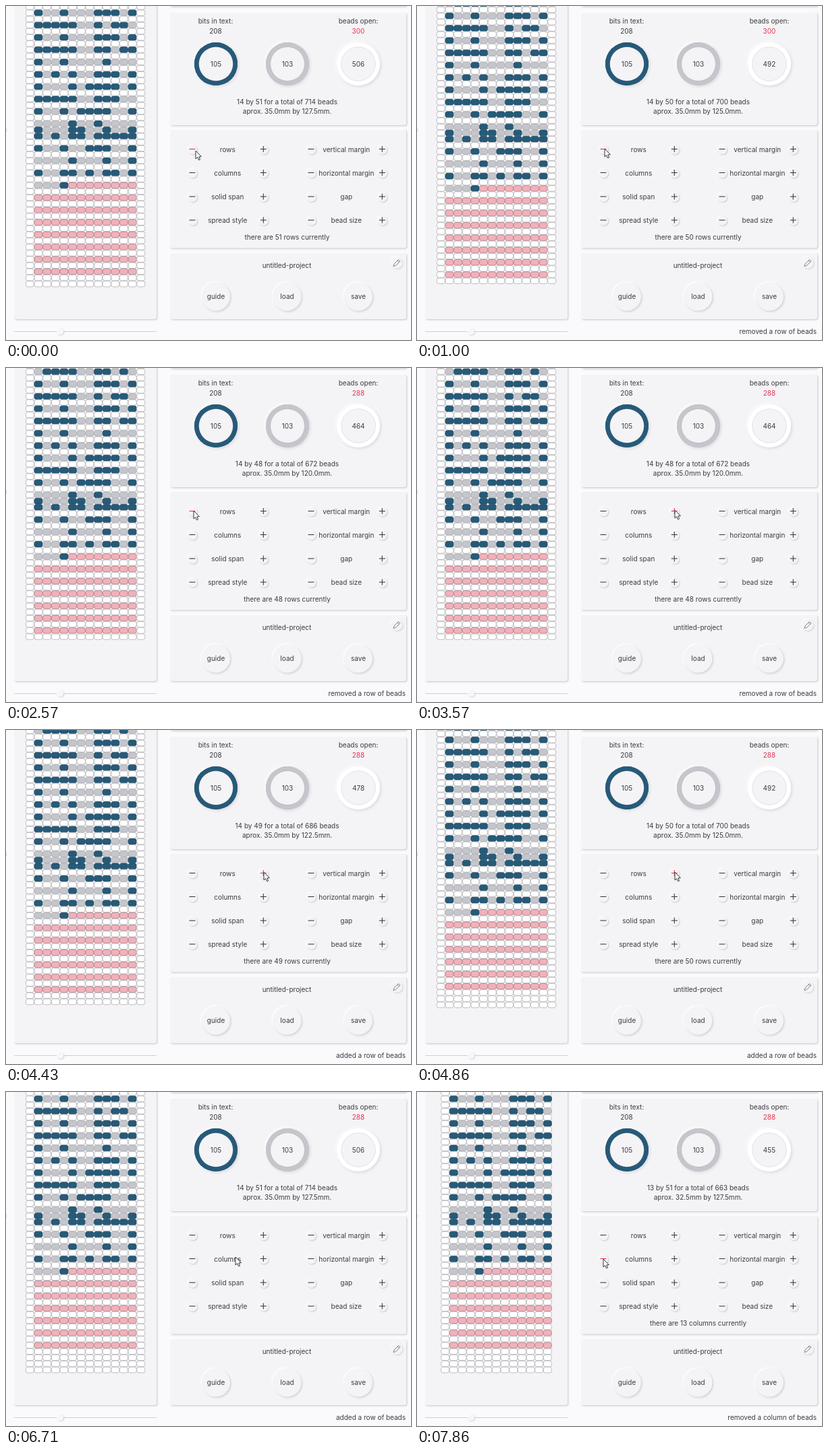
Write an HTML page with a canvas that moves like this. It is 600 by 496 pixels and loops after 8000 ms.

```html
<!DOCTYPE html>
<html lang="en">
<head>
<meta charset="utf-8">
<title>Bead pattern editor</title>
<style>
html, body { margin: 0; width: 100%; height: 100%; overflow: hidden; background: #faf9fc; }
canvas { display: block; width: 600px; height: 496px; }
</style>
</head>
<body>
<canvas id="stage"></canvas>
<script>
const W = 600, H = 496, LOOP = 8000, STEP = 1000 / 7;
const canvas = document.getElementById('stage');
const ctx = canvas.getContext('2d');
const dpr = window.devicePixelRatio || 1;
canvas.width = W * dpr;
canvas.height = H * dpr;

const PAGE = '#faf9fc', PANEL = '#f4f3f6', INK = '#3c3c40', RED = '#e6364f';
const BLUE = '#265a78', GRAY = '#c4c6cb', PINK = '#f2b1ba', WHITE = '#ffffff';
const BEAD_W = 12.65, BEAD_H = 9.15, PER_ROW = 12;

const bits = [...'when in doubt choose love.']
  .map(c => c.charCodeAt(0).toString(2).padStart(8, '0')).join('');
const ones = [...bits].filter(b => b === '1').length;

// Every second row carries bits; the middle row is filled as well.
const textRows = [];
for (let i = 2; i <= 34; i++) if (i % 2 === 0 || i === 25) textRows.push(i);

// Clicks: step, rows added, columns added
const clicks = [[4, -1, 0], [10, -1, 0], [17, -1, 0], [28, 1, 0], [33, 1, 0], [36, 1, 0], [54, 0, -1]];
// Pointer: step, x, y
const path = [[0, 281, 215], [2, 278, 212], [20, 278, 212], [25, 382, 211], [41, 382, 211],
  [45, 340, 245], [47, 340, 245], [51, 276, 248], [56, 276, 248]];

const controls = [['rows', 'vertical margin'], ['columns', 'horizontal margin'],
  ['solid span', 'gap'], ['spread style', 'bead size']];
const rowY = [213, 248, 283.5, 318.5];

function stateAt(step) {
  const s = { rows: 51, cols: 14, lastOpen: 48, note: '' };
  for (const [at, dr, dc] of clicks) {
    if (step < at) break;
    s.rows += dr;
    s.cols += dc;
    if (s.lastOpen >= s.rows) s.lastOpen -= 2;
    s.note = `${dr + dc > 0 ? 'added' : 'removed'} a ${dr ? 'row' : 'column'} of beads`;
  }
  return s;
}

function pointerAt(step) {
  let i = 0;
  while (i < path.length - 2 && step >= path[i + 1][0]) i++;
  const [t0, x0, y0] = path[i], [t1, x1, y1] = path[i + 1];
  const u = Math.min(1, (step - t0) / (t1 - t0)), e = u * u * (3 - 2 * u);
  return { x: x0 + (x1 - x0) * e, y: y0 + (y1 - y0) * e };
}

function text(str, x, y, color = INK, align = 'center') {
  ctx.font = '10px Inter, "Open Sans", sans-serif';
  ctx.textAlign = align;
  ctx.fillStyle = color;
  ctx.fillText(str, x, y + 3.7);
}

// Fill the current path raised from the page, lit from the upper left.
function raise(color, d, blur, dark = 0.17) {
  ctx.save();
  ctx.fillStyle = color;
  for (const [c, o] of [['rgba(255,255,255,.95)', -d], [`rgba(40,40,60,${dark})`, d]]) {
    ctx.shadowColor = c;
    ctx.shadowOffsetX = ctx.shadowOffsetY = o * dpr;
    ctx.shadowBlur = blur * dpr;
    ctx.fill();
  }
  ctx.restore();
}

function panel(x, y, w, h) {
  ctx.beginPath();
  ctx.roundRect(x, y, w, h, 3);
  raise(PANEL, 1.2, 2.5, 0.22);
}

function disc(x, y, r, d, blur, color = PANEL, dark) {
  ctx.beginPath();
  ctx.arc(x, y, r, 0, Math.PI * 2);
  raise(color, d, blur, dark);
}

function line(color, width, ...pts) {
  ctx.beginPath();
  pts.forEach(([x, y], i) => i ? ctx.lineTo(x, y) : ctx.moveTo(x, y));
  ctx.strokeStyle = color;
  ctx.lineWidth = width;
  ctx.stroke();
}

function beadColor(i, c, s) {
  if (c < 1 || c > PER_ROW) return WHITE;
  const r = textRows.indexOf(i);
  if (r >= 0) {
    const bit = bits[r * PER_ROW + c - 1];
    return bit === undefined ? PINK : bit === '1' ? GRAY : BLUE;
  }
  return i >= 36 && i <= s.lastOpen && i % 2 === 0 ? PINK : WHITE;
}

function beads(s) {
  const left = 117.6 - s.cols * BEAD_W / 2, top = 184 - s.rows * BEAD_H / 2;
  ctx.lineWidth = 0.8;
  for (let i = 0; i < s.rows; i++) {
    const y = top + i * BEAD_H;
    if (y < -BEAD_H) continue;
    for (let c = 0; c < s.cols; c++) {
      const color = beadColor(i, c, s);
      ctx.beginPath();
      ctx.roundRect(left + c * BEAD_W + 0.3, y + 0.3, BEAD_W - 0.6, BEAD_H - 0.6, 3);
      ctx.fillStyle = color;
      ctx.fill();
      ctx.strokeStyle = color === BLUE ? '#1f4b65' : color === PINK ? '#a97f88' : '#aeaeb3';
      ctx.stroke();
    }
  }
}

function ring(x, color, value) {
  disc(x, 86, 32, 1.5, 4, color, 0.14);
  ctx.beginPath();
  ctx.arc(x, 86, 25.3, 0, Math.PI * 2);
  ctx.fillStyle = PANEL;
  ctx.fill();
  ctx.strokeStyle = 'rgba(60,60,80,.12)';
  ctx.lineWidth = 1;
  ctx.stroke();
  text(value, x, 86.5);
}

const over = (p, x, y) => Math.hypot(p.x - x, p.y - y) < 9;

function signButton(x, y, plus, p) {
  const color = over(p, x, y) ? RED : INK;
  disc(x + 0.5, y + 0.5, 6.8, 1, 1.8, PANEL, 0.2);
  line(color, 1.1, [x - 4.5, y - 0.5], [x + 4.5, y - 0.5]);
  if (plus) line(color, 1.1, [x, y - 5], [x, y + 4]);
}

function pencil(x, y) {
  disc(x, y, 8.5, 1, 2);
  line('#77777c', 0.9, [x - 5, y + 5], [x - 4, y + 1.5], [x + 2.5, y - 5],
    [x + 5, y - 2.5], [x - 1.5, y + 4], [x - 5, y + 5]);
  line('#77777c', 0.9, [x + 1, y - 3.5], [x + 3.5, y - 1]);
}

function pointer({ x, y }) {
  const shape = [[0, 0], [0, 12], [2.7, 9.6], [4.6, 13.8], [6.6, 12.9], [4.8, 8.9], [8.4, 8.7]];
  ctx.beginPath();
  shape.forEach(([dx, dy]) => ctx.lineTo(x + dx, y + dy));
  ctx.closePath();
  ctx.fillStyle = WHITE;
  ctx.fill();
  ctx.strokeStyle = '#333';
  ctx.lineWidth = 1;
  ctx.stroke();
}

function draw(ms) {
  const step = Math.floor((ms + 3) / STEP);
  const s = stateAt(step), p = pointerAt(step), total = s.rows * s.cols;
  ctx.setTransform(dpr, 0, 0, dpr, 0, 0);
  ctx.fillStyle = PAGE;
  ctx.fillRect(0, 0, W, H);

  panel(12, -20, 211, 485);
  panel(243, -20, 350, 20.5);
  panel(243, 10, 350, 167);
  panel(243, 184, 350, 175.5);
  panel(243, 367, 350, 98);
  line('#d5d4da', 1, [0.5, 182], [0.5, 187]);

  beads(s);

  text('bits in text:', 310.5, 22.5);
  text(bits.length, 310.5, 37);
  text('beads open:', 522, 22.5);
  text(s.lastOpen === 48 ? 300 : 288, 522, 37, RED);
  ring(311, BLUE, bits.length - ones);
  ring(417, GRAY, ones);
  ring(522, WHITE, total - bits.length);
  text(`${s.cols} by ${s.rows} for a total of ${total} beads`, 416.5, 142.5);
  text(`aprox. ${(s.cols * 2.5).toFixed(1)}mm by ${(s.rows * 2.5).toFixed(1)}mm.`, 416.5, 156.5);

  controls.forEach((pair, r) => pair.forEach((label, c) => {
    const x = 276 + c * 176, y = rowY[r];
    signButton(x, y, false, p);
    signButton(x + 105.3, y, true, p);
    text(label, x + 52.3, y);
    if (over(p, x, y) || over(p, x + 105.3, y)) {
      text(`there are ${s[r ? 'cols' : 'rows']} ${label} currently`, 416.5, 343.5);
    }
  }));

  text('untitled-project', 416, 385.5);
  pencil(579, 381.5);
  ['guide', 'load', 'save'].forEach((label, i) => {
    const x = 311 + i * 105.5;
    disc(x, 431.5, 21, 1.5, 3);
    text(label, x, 431.5);
  });

  line('#cfced3', 1.2, [12, 483.5], [223, 483.5]);
  disc(80.5, 483.5, 4.8, 0.8, 1.8, '#f7f6f9', 0.22);
  text(s.note, 592, 483.5, INK, 'right');
  pointer(p);
}

const start = performance.now();
function tick() {
  draw((performance.now() - start) % LOOP);
  requestAnimationFrame(tick);
}
tick();
</script>
</body>
</html>
```
